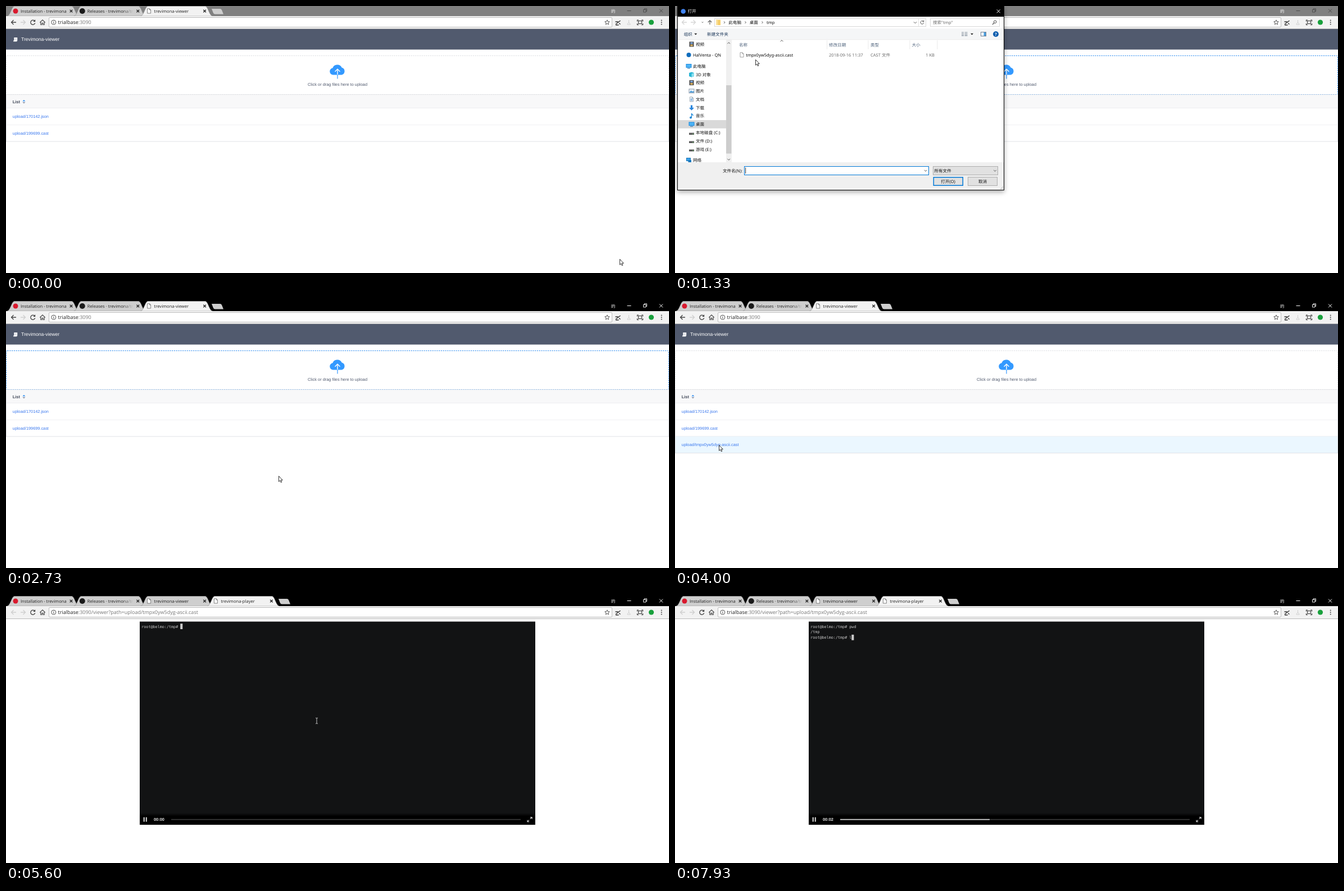
An HTML page for the animation above (8000 ms loop, 1180 by 475 pixels).

```html
<!DOCTYPE html>
<html lang="en">
<head>
<meta charset="utf-8">
<title>Screen recording</title>
<style>
  html, body { margin: 0; width: 100%; height: 100%; overflow: hidden; background: #fff; }
  svg { display: block; }
  text { white-space: pre; text-rendering: geometricPrecision; font-family: "Open Sans", "Noto Sans", "Noto Sans CJK SC", sans-serif; }
  .page { font-family: "Liberation Sans", Arial, sans-serif; }
  .cjk { font-family: "Noto Sans", "Noto Sans CJK SC", "Noto Sans CJK", sans-serif; }
  .mono { font-family: "DejaVu Sans Mono", monospace; }
  #dialog { filter: drop-shadow(0 3px 4px rgba(0, 0, 0, .35)); }
</style>
</head>
<body>
<svg id="stage" width="1180" height="475" viewBox="0 0 1180 475"></svg>
<script>
const LOOP = 8000;
const BRAND = 'trevimona';
const HOST = 'trialbase';
const FILE = 'tmpx0yw5dyg-ascii.cast';
const PROMPT = 'root@belmo:/tmp# ';
const CHAR = 4.06;

// Drawing helpers: text is placed by its vertical centre.
const text = (x, y, s, size = 7.6, fill = '#222', attrs = '') =>
  `<text x="${x}" y="${y + size * .36}" font-size="${size}" fill="${fill}" ${attrs}>${s}</text>`;
const cjk = (x, y, s, fill = '#111', attrs = '') => text(x, y, s, 7.55, fill, `class="cjk" ${attrs}`);
const page = (x, y, s, size, fill, attrs = '') => text(x, y, s, size, fill, `class="page" ${attrs}`);
const rect = (x, y, w, h, fill, attrs = '') =>
  `<rect x="${x}" y="${y}" width="${w}" height="${h}" fill="${fill}" ${attrs}/>`;
const box = (x, y, w, h, fill, stroke, attrs = '') =>
  rect(x + .5, y + .5, w - 1, h - 1, fill, `stroke="${stroke}" ${attrs}`);
const dot = (x, y, r, fill) => `<circle cx="${x}" cy="${y}" r="${r}" fill="${fill}"/>`;
const line = (d, stroke, width = 1, attrs = '') =>
  `<path d="${d}" fill="none" stroke="${stroke}" stroke-width="${width}" ${attrs}/>`;
const shape = (d, fill, attrs = '') => `<path d="${d}" fill="${fill}" ${attrs}/>`;
const group = (id, body, attrs = '') => `<g id="${id}" ${attrs}>${body}</g>`;
const at = (x, y, body) => `<g transform="translate(${x} ${y})">${body}</g>`;
const cross = (x, y, r, stroke, width = 1) =>
  line(`M${x - r} ${y - r}l${2 * r} ${2 * r}m0 ${-2 * r}l${-2 * r} ${2 * r}`, stroke, width);
const sheet = (x, y, stroke = '#666', fill = '#fff') =>
  at(x, y, shape('M-3-4.2H1L3-2V4H-3ZM1-4.2V-2H3', fill, `stroke="${stroke}" stroke-width=".8"`));

// Browser window
function tab(index, title, icon, active, fill = '#222') {
  const x = 5 + 118.8 * index;
  return shape(`M${x - 3} 18C${x + 3} 17 ${x + 5} .5 ${x + 10} .5H${x + 112}C${x + 117} .5 ${x + 119} 17 ${x + 125} 18Z`,
      active ? '#f2f2f2' : '#cecece', 'stroke="#8b8b8b" stroke-width=".6"') +
    icon(x + 12) + text(x + 21, 9, title, 7.6, fill) + cross(x + 111, 9, 2.3, '#222', 1.3);
}
const newTab = x => shape(`M${x} 5h15q2 0 3 2l3 7.5h-15q-2 0-3-2z`, '#cecece');
const fileIcon = x => sheet(x, 9);
const pinned = () =>
  tab(0, `Installation - ${BRAND}`, x => dot(x, 9, 4.5, '#d9182d')) +
  tab(1, `Releases · ${BRAND}/tr`, x => dot(x, 9, 5, '#1b1b1b'), false, 'url(#fade)');
const arrow = (x, dir, color) =>
  line(`M${x + 4.5 * dir} 29H${x - 4 * dir}m${4 * dir}-4l${-4 * dir} 4l${4 * dir} 4`, color, 1.3);

const tabs =
  group('homeTabs', pinned() + newTab(366) + tab(2, `${BRAND}-viewer`, fileIcon, true)) +
  group('playerTabs', pinned() + tab(2, `${BRAND}-viewer`, fileIcon) + newTab(485) +
    tab(3, `${BRAND}-player`, x =>
      group('tabFile', fileIcon(x)) +
      group('spinner', at(x, 9, line('M0-4A4 4 0 0 0-3.4 2', '#4a8df0', 1.3, 'id="arc"'))), true));

const windowButtons = group('buttons',
  line('M1105.5 8.5h7', 'currentColor') +
  line('M1134.5 6.5h4.5v4.5h-4.5zM1136 6v-1.2h4.5v4.7h-1.3', 'currentColor', .9) +
  cross(1166, 8.5, 3, 'currentColor'));

const toolbar = rect(0, 18, 1180, 22.5, '#f2f2f2') + rect(0, 40, 1180, 1, '#b9b9b9') +
  group('back', arrow(13.5, 1, 'currentColor')) + arrow(30.5, -1, '#cfcfcf') +
  group('reload', line('M51.2 27A4 4 0 1 0 51.7 30.3', '#444', 1.3) + shape('M52.2 24v4h-4z', '#444')) +
  group('stop', cross(47.7, 29, 3.5, '#444', 1.4)) +
  line('M60.2 29.4L65 24.8 69.8 29.4M61.8 28.5V33.3H64V30.3H66V33.3H68.2V28.5', '#444', 1.1) +
  box(76, 20, 1003, 18, '#fff', '#bdbdbd', 'rx="1.5"') +
  `<circle cx="84.8" cy="29" r="4" fill="none" stroke="#555"/>` + rect(84.3, 28.3, 1.1, 3, '#555') + rect(84.3, 26.5, 1.1, 1.1, '#555') +
  `<text x="92.5" y="32.2" font-size="9" fill="#222">${HOST}<tspan id="path" fill="#777"></tspan></text>` +
  shape('M1070 24.8l1.2 2.8 3 .3-2.3 2 .7 3-2.6-1.6-2.6 1.6.7-3-2.3-2 3-.3z', 'none', 'stroke="#444" stroke-width=".9"') +
  line('M1085 32.5l8.5-6.5M1084.5 28h5M1085 33.8h5.5M1091 30.5l2.5 2', '#333', 1.4) +
  line('M1108.5 25v4l-3 4M1108.5 29l3 4M1106 33h5', '#cfcfcf', 1) +
  line('M1123.5 27.5v-2.5h2.5m5 0h2.5v2.5m0 3.5v2.5h-2.5m-5 0h-2.5v-2.5', '#333', 1.1) +
  box(1125, 26, 7, 6, 'none', '#333') +
  dot(1148.5, 29, 4.6, '#18a03c') +
  [25.5, 29, 32.5].map(y => dot(1166.7, y, 1, '#444')).join('');

// File list page
const rowY = i => 182 + 29.5 * i;
const listRow = (i, name) => group('row' + i,
  rect(0, rowY(i), 1180, 29.5, '#fff', `id="rowFill${i}"`) +
  rect(0, rowY(i) + 29, 1180, 1, '#e1e3e7') +
  rect(0, rowY(i), 1, 30, '#dcdee2') + rect(1179, rowY(i), 1, 30, '#dcdee2') +
  page(11.8, rowY(i) + 14.7, 'upload/' + name, 7.35, '#3a78ee'));

const home = group('home',
  rect(0, 41, 1180, 36.5, '#515a6e') +
  shape('M14.3 56h5.9v5.2q0 2-2 2h-5v-2h1.1z', '#fff') + line('M15.6 58h3.2m-3.2 1.7h3.2', '#9aa1b0', .6) +
  page(27, 59.2, `T${BRAND.slice(1)}-viewer`, 8.65, '#fff') +
  box(0, 88, 1180, 70, '#fff', '#dcdee2', 'id="drop" stroke-dasharray="2.2 1.6" rx="2"') +
  shape('M582 122.5a6.2 6.2 0 0 1-.6-12.3 8.8 8.8 0 0 1 16.2-.8 6.8 6.8 0 0 1 0 13.1z', '#3399ff') +
  line('M590 112.5V122M585.5 116.7l4.5-4.5 4.5 4.5', '#fff', 1.4) + rect(589.2, 122, 1.6, 7.5, '#3399ff', 'opacity=".75"') +
  page(590, 139, 'Click or drag files here to upload', 7.4, '#515a6e', 'text-anchor="middle"') +
  rect(0, 158, 1180, 24, '#f8f8f9') + rect(0, 157, 1180, .6, '#dcdee2') + rect(0, 181.5, 1180, 1, '#e4e6ea') +
  rect(0, 158, 1, 24, '#dcdee2') + rect(1179, 158, 1, 24, '#dcdee2') +
  page(11.8, 170, 'List', 7.4, '#3f4757', 'font-weight="bold"') +
  shape('M29.3 169.5l2.6-2.6 2.6 2.6z', '#2d8cf0') + shape('M29.3 171l2.6 2.6 2.6-2.6z', '#8a94a8') +
  listRow(0, '170142.json') + listRow(1, '199699.cast') + listRow(2, FILE));

// Player page
const player = group('player',
  rect(238, 45.5, 704, 361.5, '#121314') +
  rect(238, 386, 704, 6, 'url(#bar)') + rect(238, 391, 704, 16, '#000') +
  group('start', dot(588, 216.5, 25, '#fff') + shape('M244.5 393.4v8.4l6.7-4.2z', '#bbb')) +
  group('pause', rect(244.6, 393.6, 2.2, 8, '#ccc') + rect(248.7, 393.6, 2.2, 8, '#ccc')) +
  page(263, 397.5, '', 7.4, '#e4e4e4', 'id="clock" font-weight="bold"') +
  rect(294, 396.8, 622, 1.7, '#3a3a3a') + rect(294, 396.8, 0, 1.7, '#d0d0d0', 'id="progress"') +
  line('M933 396.5l3-3m-3 0h3.2v3.2M931 398.7l-3 3m3.2 0H928v-3.2', '#ccc', 1.1) +
  [0, 1, 2].map(i => text(241.2, 54.2 + 9.8 * i, '', 6.75, '#ccc', `class="mono" id="term${i}"`)).join('') +
  rect(0, 0, 4.1, 9.8, '#ccc', 'id="caret"'));

// Open-file dialog
const places = [
  ['视频', 68, 37, 'film'], ['HalVenta - QN', 87, 32, 'mark'], ['此电脑', 107, 32, 'screen'],
  ['3D 对象', 122, 37, 'cube'], ['视频', 136.5, 37, 'film'], ['图片', 151.3, 37, 'image'],
  ['文档', 166, 37, 'doc'], ['下载', 181, 37, 'down'], ['音乐', 195.5, 37, 'note'],
  ['桌面', 210.3, 37, 'screen'], ['本地磁盘 (C:)', 225.2, 37, 'disk'], ['文件 (D:)', 240, 37, 'disk'],
  ['游戏 (E:)', 254.8, 37, 'disk'], ['网络', 274, 32, 'net']
];
const icons = {
  film: rect(-4, -4.5, 8, 9, '#4a4a4a') + rect(-2.2, -3.5, 4.4, 3, '#7ca4d8') + rect(-2.2, .5, 4.4, 3, '#d8b060'),
  mark: dot(0, 0, 4, '#0f6cbd'),
  screen: rect(-5, -4, 10, 6.8, '#1b8ae0') + rect(-4, -3, 8, 4.8, '#4db4f5') + rect(-2.5, 3.4, 5, 1, '#1b6fae'),
  cube: shape('M-4.5-3L0-4.5 4.5-3V3L0 4.8-4.5 3z', '#29b5d5') + shape('M0-1.5L4.5-3V3L0 4.8z', '#8be0ef'),
  image: box(-5, -4, 10, 8, '#eef4fa', '#8a98a8') + shape('M-4 2.8L-1-1 1 1 4 0V2.8z', '#4a9bd8'),
  doc: sheet(0, 0, '#8798a8') + line('M-1.8-1h3.6m-3.6 1.6h3.6m-3.6 1.6h3.6', '#3c83c8', .8),
  down: shape('M-1.6-4.5h3.2V0H4.5L0 4.8-4.5 0h2.9z', '#2a86dc'),
  note: dot(-1.5, 3, 2, '#1e88d8') + line('M0 3V-4.5Q1-2 3.2-.8', '#1e88d8', 1.3),
  disk: rect(-4.5, 0, 9, 3.6, '#9a9a9a') + rect(-4.5, 1.4, 9, 2.2, '#444') + rect(2, 2, 1.5, 1, '#6fe06f'),
  net: box(-4.5, -4, 8, 6, '#3ba3ea', '#1d74b5') + shape('M-1 0h5.5v4.5H-1z', '#1878bd')
};
const chevron = (x, y, r = 2.2, dir = 1) =>
  line(`M${x - r} ${y - dir * r / 2}l${r} ${dir * r}l${r} ${-dir * r}`, '#444', .9);
const caretDown = (x, y) => shape(`M${x - 2.5} ${y - 1.3}h5l-2.5 2.8z`, '#222');
const crumb = x => line(`M${x} 27.3l1.8 1.9-1.8 1.9`, '#444', .9);

const dialog = group('dialog',
  rect(4, 0, 582, 328, '#000') + rect(5, 19, 580, 308, '#fff') +
  dot(14.7, 9.5, 4.3, '#4285f4') + cjk(22.5, 9.5, '打开', '#fff') + cross(575.7, 9.3, 3, '#fff') +
  arrow(16.5, 1, '#d6d6d6') + arrow(32.5, -1, '#d6d6d6') + chevron(49, 29, 1.3) +
  line('M62 33V25.7m-3.3 3.3l3.3-3.3 3.3 3.3', '#555', 1.1) +
  box(70, 22, 377, 15, '#fff', '#d9d9d9') + rect(433, 23, 1, 13, '#e2e2e2') +
  rect(73, 24.5, 8, 9.5, '#f6cf6c') + rect(73, 24.5, 3, 9.5, '#fbe09a') +
  crumb(87) + cjk(95.3, 29.2, '此电脑') + crumb(124.5) + cjk(132.8, 29.2, '桌面') + crumb(154.5) + cjk(163, 29.2, 'tmp') +
  chevron(427.5, 29.5, 2.6) + line('M442 27.2A2.9 2.9 0 1 0 442.8 29.8M442.8 25.5v2.3h-2.4', '#444', .9) +
  box(454, 22, 124, 15, '#fff', '#d9d9d9') + cjk(459, 29.2, '搜索"tmp"', '#6d6d6d') +
  line('M565 33l3-3.2', '#444', 1.1) + `<circle cx="569.7" cy="28.2" r="2.3" fill="none" stroke="#444"/>` +
  rect(5, 40, 580, 20, '#f5f6f7') + rect(5, 59.5, 580, .7, '#e6e6e6') +
  cjk(15.8, 50, '组织', '#1e395b') + caretDown(36.8, 50) + cjk(57, 50, '新建文件夹', '#1e395b') +
  line('M510 47h4m1.5 0h5M510 49.8h4m1.5 0h5M510 52.6h4m1.5 0h5', '#7a8694', 1.2) + caretDown(528.5, 50) +
  box(544, 46, 10, 8, '#fff', '#6e7f92') + rect(549.5, 47, 3.5, 6, '#4a9fe0') +
  dot(571, 50, 5, '#0b5cad') + text(571, 50, '?', 7.5, '#fff', 'text-anchor="middle" font-weight="bold"') +
  rect(5, 203, 86, 14.7, '#d9d9d9') +
  places.map(([name, y, x, icon]) => at(x - 7.5, y, icons[icon]) + cjk(x, y, name)).join('') +
  rect(91, 60, 10, 218, '#f0f0f0') + rect(91, 141, 9.5, 121.5, '#cdcdcd') +
  chevron(95.7, 66, 2.4, -1) + chevron(95.7, 273, 2.4) +
  [270, 343.5, 417.5, 466.5].map(x => rect(x, 61, .8, 16, '#e5e5e5')).join('') + chevron(190, 62, 2.4, -1) +
  [[114, '名称'], [274, '修改日期'], [348, '类型'], [421.5, '大小']].map(([x, s]) => cjk(x, 69, s, '#4c607a')).join('') +
  box(112, 80, 355, 14, 'none', 'none', 'id="pick"') +
  sheet(119, 87, '#8a8a8a') + cjk(126.3, 87, FILE) + cjk(274, 87, '2018-09-16 11:37', '#6d6d6d') +
  cjk(348, 87, 'CAST 文件', '#6d6d6d') + cjk(462, 87, '1 KB', '#6d6d6d', 'text-anchor="end"') +
  rect(5, 278, 580, 49, '#f0f0f0') + cjk(120, 293, '文件名(N):', '#111', 'text-anchor="end"') +
  box(123, 285, 329, 16, '#fff', '#0078d7', 'id="field"') + chevron(446, 293, 2.3) +
  rect(125.3, 287.5, .8, 10.5, '#000', 'id="fieldCaret"') + group('fieldText', cjk(126, 293, FILE)) +
  box(459, 285, 116, 16, '#e1e1e1', '#adadad', 'id="filter"') + cjk(461.5, 293, '所有文件') + chevron(569.5, 293, 2.3) +
  rect(460.3, 304.8, 52, 14.4, '#e1e1e1', 'id="open" stroke="#0078d7" stroke-width="1.5"') +
  cjk(486, 312, '打开(O)', '#111', 'text-anchor="middle"') +
  box(521, 304, 53, 16, '#e1e1e1', '#adadad') + cjk(547.5, 312, '取消', '#111', 'text-anchor="middle"') +
  line('M579 326l5-5m-2.5 5l2.5-2.5', '#b5b5b5', .9));

// Mouse pointers, each with its hot spot at the origin
const outline = 'stroke="#000" stroke-width=".8" stroke-linejoin="round"';
const pointers = group('pointer',
  group('arrow', shape('M.5.5V10.3L2.7 8.3 4.3 11.8 5.8 11.1 4.3 7.7H7.3Z', '#fff', outline)) +
  group('hand', shape('M-1.2 1Q0-.8 1.2 1V5L5 6Q6.4 6.6 6 9L5 13.5H-1L-4 9Q-3.6 7.2-1.2 8.6Z', '#fff', outline)) +
  group('beam', line('M-2-5h1.5l.5.6.5-.6H2M0-4.5v9M-2 5h1.5l.5-.6.5.6H2', '#d8d8d8', .9)));

document.getElementById('stage').innerHTML = `<defs>
  <linearGradient id="fade" gradientUnits="userSpaceOnUse" x1="208" x2="227" y1="0" y2="0">
    <stop stop-color="#222"/><stop offset="1" stop-color="#222" stop-opacity="0"/></linearGradient>
  <linearGradient id="bar" x1="0" x2="0" y1="0" y2="1">
    <stop stop-color="#000" stop-opacity="0"/><stop offset="1"/></linearGradient></defs>` +
  rect(0, 0, 1180, 475, '#fff') + rect(0, 0, 1180, 18, '#808080', 'id="titleBar"') +
  tabs + cjk(1077, 9, '的', '#fff') + windowButtons + toolbar + home + player + dialog + pointers;

const el = {};
document.querySelectorAll('[id]').forEach(node => el[node.id] = node);
const show = (id, on) => el[id].style.display = on ? '' : 'none';
const set = (id, attrs) => Object.entries(attrs).forEach(([k, v]) => el[id].setAttribute(k, v));

// Pointer path: time, x, y
const route = [
  [70, 1092, 450], [470, 545, 118], [870, 545, 118], [1330, 143, 95], [1670, 150, 86],
  [1870, 150, 86], [2600, 485, 311], [2870, 485, 311], [3470, 300, 290], [3530, 300, 290],
  [4000, 78, 256], [4070, 78, 255], [4330, 416, 223], [4400, 416, 223], [5200, 553, 218],
  [5400, 553, 218], [5530, 553, 222], [5600, 553, 222], [6200, 187, 330], [6270, 187, 330], [6670, 20, 477]
];
function pointerAt(now) {
  const i = route.findIndex(key => key[0] > now);
  if (i < 0) return route[route.length - 1].slice(1);
  if (i === 0) return route[0].slice(1);
  const [t0, x0, y0] = route[i - 1], [t1, x1, y1] = route[i];
  const u = (now - t0) / (t1 - t0), e = u * u * (3 - 2 * u);
  return [x0 + (x1 - x0) * e, y0 + (y1 - y0) * e];
}

// Terminal output: time, lines
const output = [
  [5400, ['']], [6400, ['p']], [6600, ['pw']], [6870, ['pwd']],
  [7200, ['pwd', '/tmp', '']], [7930, ['pwd', '/tmp', 'l']]
];
function drawTerminal(now) {
  const last = output.filter(step => step[0] <= now).pop();
  const lines = last ? last[1].map((s, i) => i === 1 ? s : PROMPT + s) : [];
  for (let i = 0; i < 3; i++) el['term' + i].textContent = lines[i] || '';
  show('caret', last && (now - last[0]) % 1000 < 500);
  if (last) set('caret', { x: 241.2 + CHAR * lines[lines.length - 1].length, y: 49.2 + 9.8 * (lines.length - 1) });
}

function draw(now) {
  const [x, y] = pointerAt(now);
  const over = (l, t, r, b) => x >= l && x <= r && y >= t && y <= b;
  const inPlayer = now >= 4130, playing = now >= 5400, loading = now < 4600;
  const focused = now >= 2670 || (now >= 530 && now < 670);

  set('titleBar', { fill: focused ? '#000' : '#808080' });
  el.buttons.style.color = focused ? '#fff' : '#4a4a4a';
  el.back.style.color = inPlayer ? '#cfcfcf' : '#444';
  show('homeTabs', !inPlayer);
  show('playerTabs', inPlayer);
  show('stop', inPlayer && loading);
  show('reload', !(inPlayer && loading));
  show('spinner', loading);
  show('tabFile', !loading);
  set('arc', { transform: `rotate(${(now - 4330) * .5})` });
  el.path.textContent = ':3090' + (inPlayer ? '/viewer?path=upload/' + FILE : '');

  show('home', !inPlayer);
  set('drop', { stroke: now >= 400 && now < 2870 ? '#2d8cf0' : '#dcdee2' });
  show('row2', now >= 2930);
  for (let i = 0; i < 3; i++) {
    set('rowFill' + i, { fill: now >= 2930 && over(0, rowY(i), 1180, rowY(i) + 29) ? '#ebf7ff' : '#fff' });
  }

  show('dialog', now >= 870 && now < 2670);
  el.dialog.style.opacity = Math.min(1, .4 + (now - 870) / 220);
  const picked = now >= 1800;
  set('pick', {
    fill: picked ? '#cce8ff' : over(112, 80, 467, 94) ? '#e5f3ff' : 'none',
    stroke: picked && over(112, 80, 467, 94) ? '#99d1ff' : 'none'
  });
  set('field', { stroke: picked ? '#7a7a7a' : '#0078d7' });
  show('fieldCaret', !picked);
  show('fieldText', picked);
  set('filter', { fill: over(459, 285, 575, 301) ? '#e5f1fb' : '#e1e1e1' });
  set('open', { fill: over(460, 304, 513, 320) ? '#e5f1fb' : '#e1e1e1' });

  show('player', inPlayer);
  show('start', !playing);
  show('pause', playing);
  const elapsed = Math.max(0, now - 5400);
  el.clock.textContent = '00:0' + Math.floor(elapsed / 1000);
  set('progress', { width: 38 * Math.floor((elapsed + 5) / 333.3) });
  drawTerminal(now);

  const hand = (now >= 400 && now < 870) || (now >= 4070 && now < 5470);
  const beam = now >= 5470 && x > 238;
  show('hand', hand);
  show('beam', beam);
  show('arrow', !hand && !beam);
  set('pointer', { transform: `translate(${x} ${y})` });
}

function frame() {
  const tick = Math.floor((performance.now() % LOOP + 4) * 15 / 1000);
  draw(Math.round(tick * 20 / 3) * 10 % LOOP);
  requestAnimationFrame(frame);
}
frame();
</script>
</body>
</html>
```
